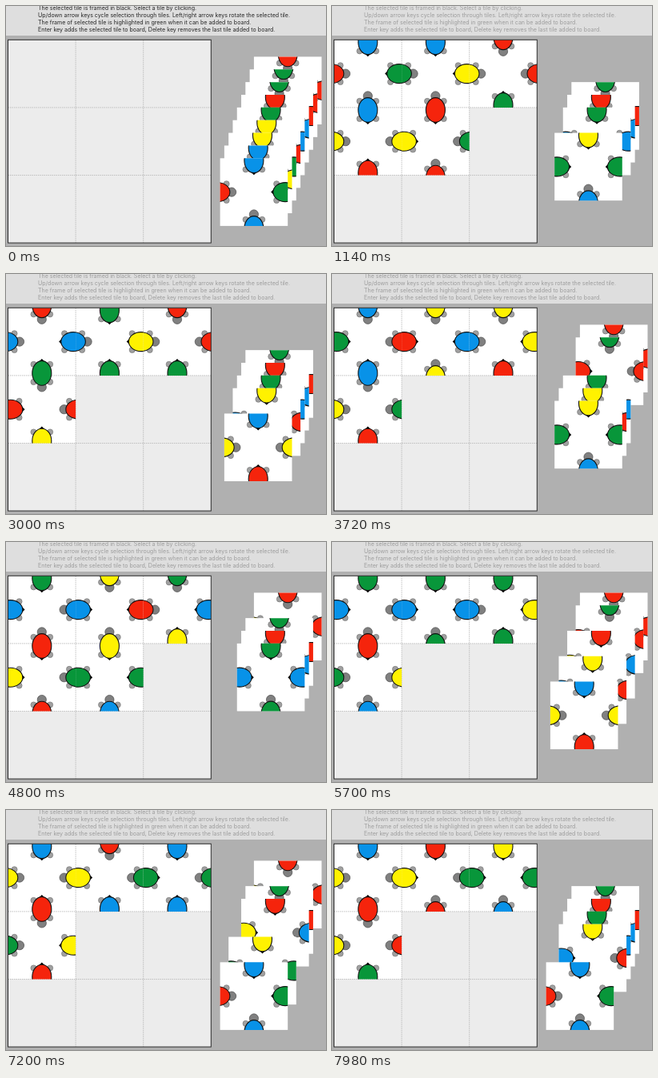
Recreate the animation shown at these times as an HTML page with a canvas. Size 400 by 300 pixels, loop 8 s.

```html
<!DOCTYPE html>
<html lang="en">
<head>
<meta charset="utf-8">
<title>Turtle tile puzzle solver</title>
<style>
  html, body { margin: 0; width: 100%; height: 100%; overflow: hidden; background: #b0b0b0; }
  canvas { position: absolute; left: 0; top: 0; width: 400px; height: 300px; }
  #help {
    position: absolute; left: 0; top: 0; width: 400px; height: 37px;
    overflow: hidden; background: #dedede; color: #262626;
  }
  #help.busy { color: #9c9c9c; }
  #help p {
    position: absolute; left: 40px; top: -1.2px; margin: 0;
    font: 7.05px/8.9px Inter, "Liberation Sans", sans-serif; white-space: pre;
  }
</style>
</head>
<body>
<canvas id="stage"></canvas>
<div id="help"><p>The selected tile is framed in black. Select a tile by clicking.
Up/down arrow keys cycle selection through tiles. Left/right arrow keys rotate the selected tile.
The frame of selected tile is highlighted in green when it can be added to board.
Enter key adds the selected tile to board, Delete key removes the last tile added to board.</p></div>
<script>
const LOOP = 8000, START = 720, STEP = 60, MOVES_PER_STEP = 4;
const STEPS = Math.ceil((LOOP - START) / STEP);
const SIZE = 84.6, BOARD_X = 2.5, BOARD_Y = 42.3;

// Edges clockwise from the top: upper case is a head half, lower case a tail half.
const TILES = ['RRgY', 'GRyr', 'GrYB', 'rBYy', 'gbGb', 'yRGb', 'ygBg', 'bYrY', 'bgBR'];
const SHELL = { r: '#f5240c', g: '#08963a', b: '#0892e8', y: '#fff200' };
const [TOP, RIGHT, BOTTOM, LEFT] = [0, 1, 2, 3];

const edge = ({ tile, turn }, side) => TILES[tile][(side - turn + 4) % 4];
const joins = (a, b) => a !== b && a.toLowerCase() === b.toLowerCase();

function fits(placed, piece) {
  const pos = placed.length;
  return (pos % 3 === 0 || joins(edge(placed[pos - 1], RIGHT), edge(piece, LEFT))) &&
    (pos < 3 || joins(edge(placed[pos - 3], BOTTOM), edge(piece, TOP)));
}

// Depth-first search, yielding the board after every placement.
function* search(placed) {
  for (let tile = TILES.length - 1; tile >= 0; tile--) {
    if (placed.some(p => p.tile === tile)) continue;
    for (let turn = 0; turn < 4; turn++) {
      const piece = { tile, turn };
      if (!fits(placed, piece)) continue;
      const next = [...placed, piece];
      yield next;
      yield* search(next);
    }
  }
}

const boards = [[]];
let moves = 0;
for (const board of search([])) {
  if (++moves % MOVES_PER_STEP === 0) boards.push(board);
  if (boards.length > STEPS) break;
}

const canvas = document.getElementById('stage');
const help = document.getElementById('help');
const ctx = canvas.getContext('2d');
const ratio = window.devicePixelRatio || 1;
canvas.width = 400 * ratio;
canvas.height = 300 * ratio;
ctx.scale(ratio, ratio);

function oval(x, y, rx, ry, fill, stroke, width) {
  ctx.beginPath();
  ctx.ellipse(x, y, rx, ry, 0, 0, 2 * Math.PI);
  ctx.fillStyle = fill;
  ctx.fill();
  ctx.strokeStyle = stroke;
  ctx.lineWidth = width;
  ctx.stroke();
}

// The head points along +y; the tile edge crosses the body at y = 0.
function drawTurtle(color) {
  for (const x of [-10.3, 10.3])
    for (const y of [8, -14]) oval(x, y, 3.6, 3.6, '#a0a0a0', '#707070', 0.6);
  oval(0, 14.5, 5.6, 5.6, '#808080', '#4a4a4a', 0.7);
  ctx.beginPath();
  ctx.moveTo(-4, -17);
  ctx.lineTo(0, -21);
  ctx.lineTo(4, -17);
  ctx.fillStyle = '#000';
  ctx.fill();
  oval(0, -3, 12, 15.3, color, '#111', 1.1);
}

function drawTurtles({ tile, turn }, x, y) {
  ctx.save();
  ctx.beginPath();
  ctx.rect(x, y, SIZE, SIZE);
  ctx.clip();
  ctx.translate(x + SIZE / 2, y + SIZE / 2);
  ctx.rotate(turn * Math.PI / 2);
  for (const half of TILES[tile]) {
    const color = half.toLowerCase();
    ctx.save();
    ctx.translate(0, -SIZE / 2);
    if (half === color) ctx.rotate(Math.PI);
    drawTurtle(SHELL[color]);
    ctx.restore();
    ctx.rotate(Math.PI / 2);
  }
  ctx.restore();
}

function fillSquare(x, y, size, color) {
  ctx.fillStyle = color;
  ctx.fillRect(x, y, size, size);
}

function drawGrid() {
  ctx.save();
  ctx.setLineDash([1.5, 1]);
  ctx.lineWidth = 0.8;
  ctx.strokeStyle = '#b4b4b4';
  ctx.beginPath();
  for (const i of [1, 2]) {
    const x = BOARD_X + i * SIZE, y = BOARD_Y + i * SIZE;
    ctx.moveTo(x, BOARD_Y);
    ctx.lineTo(x, BOARD_Y + 3 * SIZE);
    ctx.moveTo(BOARD_X, y);
    ctx.lineTo(BOARD_X + 3 * SIZE, y);
  }
  ctx.stroke();
  ctx.restore();
}

function drawBoard(placed) {
  const cell = i => [BOARD_X + i % 3 * SIZE, BOARD_Y + Math.floor(i / 3) * SIZE];
  fillSquare(BOARD_X, BOARD_Y, 3 * SIZE, '#ececec');
  placed.forEach((_, i) => fillSquare(...cell(i), SIZE, '#fff'));
  drawGrid();
  placed.forEach((piece, i) => drawTurtles(piece, ...cell(i)));
  ctx.strokeStyle = '#2a2a2a';
  ctx.lineWidth = 1;
  ctx.strokeRect(BOARD_X, BOARD_Y, 3 * SIZE, 3 * SIZE);
}

function drawStack(placed) {
  TILES.forEach((_, tile) => {
    if (placed.some(p => p.tile === tile)) return;
    const x = 309.9 - tile * SIZE / 16, y = 63.4 + tile * SIZE * 3 / 16;
    fillSquare(x, y, SIZE, '#fff');
    drawTurtles({ tile, turn: 0 }, x, y);
  });
}

let shown = -1;
function frame() {
  const time = performance.now() % LOOP;
  const step = time < START ? 0 : Math.floor((time - START) / STEP) + 1;
  if (step !== shown) {
    shown = step;
    ctx.fillStyle = '#b0b0b0';
    ctx.fillRect(0, 0, 400, 300);
    drawBoard(boards[step]);
    drawStack(boards[step]);
    help.classList.toggle('busy', step > 0);
  }
  requestAnimationFrame(frame);
}
frame();
</script>
</body>
</html>
```
